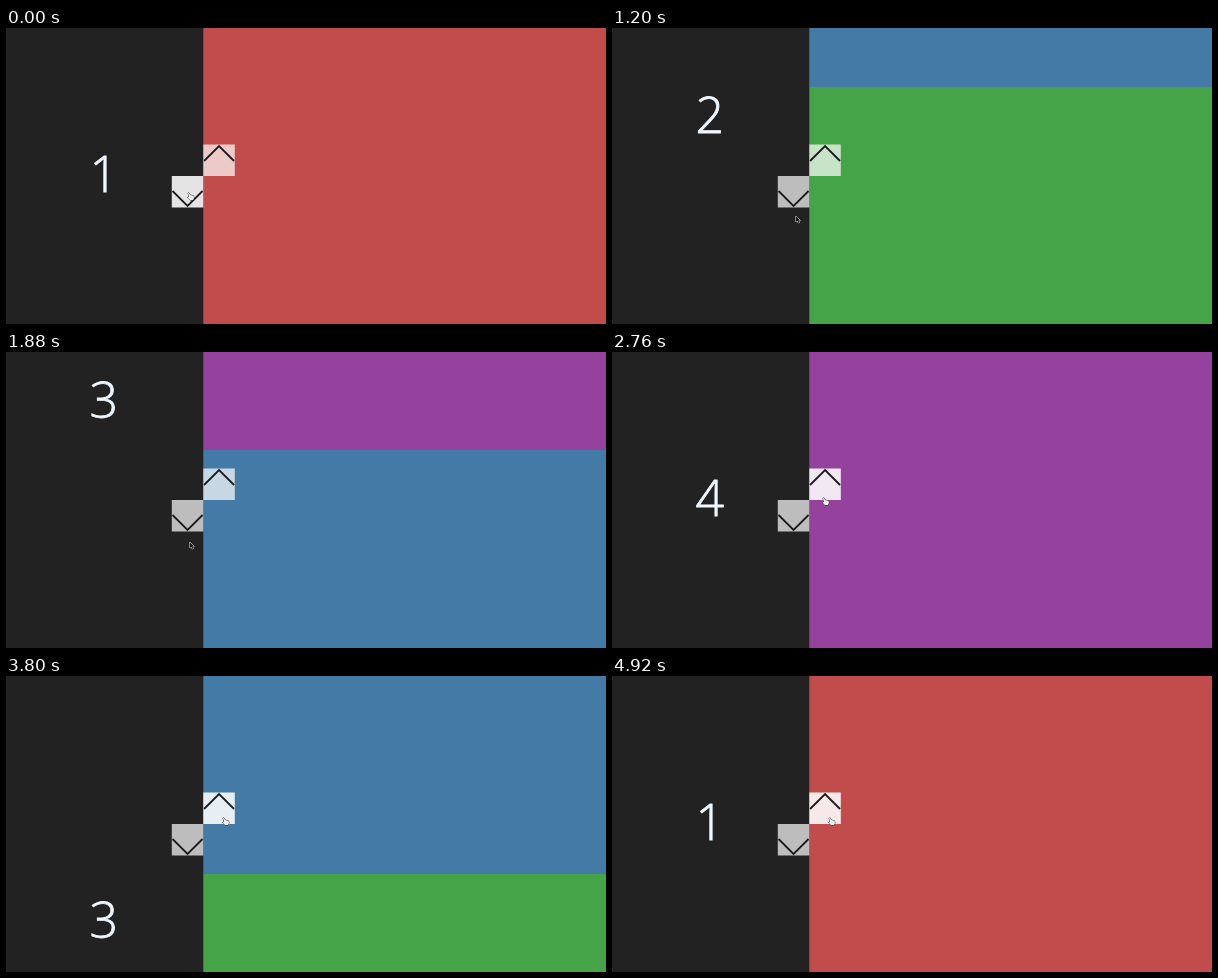
Write an HTML page with a canvas that moves like this. It is 600 by 296 pixels and loops after 4.96 s.

```html
<!DOCTYPE html>
<html lang="en">
<head>
<meta charset="utf-8">
<title>Double vertical slider</title>
<style>
  html, body { margin: 0; height: 100%; overflow: hidden; background: #232223; }
  canvas { display: block; }
</style>
</head>
<body>
<canvas id="stage" width="600" height="296"></canvas>
<script>
const ctx = document.getElementById('stage').getContext('2d');
const LOOP = 4960, W = 600, H = 296, MIDDLE = H / 2, SPLIT = 197.3;
const SLIDE_MS = 450, BUTTON = 31.5;
const COLORS = ['#c14c4b', '#45a447', '#437ba6', '#95429f'];

// step: slide direction; dip: how far the pointer drops away after the click
const CLICKS = [
  { time: 610, step: 1, dip: 0 },
  { time: 1062, step: 1, dip: 23 },
  { time: 1701, step: 1, dip: 25 },
  { time: 2862, step: -1, dip: 0 },
  { time: 3621, step: -1, dip: 0 },
  { time: 4155, step: -1, dip: 14 }
];
const ON_DOWN = { x: 184, y: 165 }, ON_UP = { x: 219, y: 142 };

const ARROW = new Path2D('M0 0V6L1.4 4.8L2.4 7L3.4 6.5L2.5 4.4H4.2Z');
const HAND = new Path2D('M-2 0H-.8L0 2L3.5 2.8L4 5L3 7H0L-2.5 4.5L-1 4Z');

// cubic-bezier(.42, 0, .58, 1), solved by bisection
function easeInOut(p) {
  if (p <= 0) return 0;
  if (p >= 1) return 1;
  let low = 0, high = 1;
  for (let i = 0; i < 24; i++) {
    const s = (low + high) / 2, r = 1 - s;
    const x = 1.26 * s * r * r + 1.74 * s * s * r + s * s * s;
    if (x < p) low = s; else high = s;
  }
  return low * low * (3 - 2 * low);
}

const ramp = (t, start, duration) => easeInOut((t - start) / duration);
const mix = (a, b, p) => a + (b - a) * p;
const sumClicks = term => CLICKS.reduce((sum, click) => sum + term(click), 0);

function slidePosition(t) {
  return sumClicks(({ time, step }) => step * ramp(t, time, SLIDE_MS));
}

function pointerAt(t) {
  const crossing = ramp(t, 2320, 620);
  const drop = sumClicks(({ time, dip }) =>
    dip * (ramp(t, time, 140) - ramp(t, time + 520, 160)));
  return {
    x: mix(ON_DOWN.x, ON_UP.x, crossing),
    y: mix(ON_DOWN.y, ON_UP.y, crossing) + drop
  };
}

function drawSlides(position) {
  ctx.fillStyle = '#232223';
  ctx.fillRect(0, 0, W, H);
  ctx.font = '300 50px "Open Sans", "Noto Sans", sans-serif';
  ctx.textAlign = 'center';
  ctx.strokeStyle = '#f0f8ff';
  ctx.lineWidth = 0.8;
  COLORS.forEach((color, i) => {
    const offset = (i - position) * H;
    if (Math.abs(offset) >= H) return;
    ctx.fillStyle = color;
    ctx.fillRect(SPLIT, Math.round(-offset), W - SPLIT, H);
    ctx.fillStyle = '#f0f8ff';
    ctx.fillText(i + 1, SPLIT / 2 - 1, 164 + offset);
    ctx.strokeText(i + 1, SPLIT / 2 - 1, 164 + offset);
  });
}

// direction: -1 points up, right of the split; 1 points down, left of it
function drawButton(direction, pointer) {
  const x = direction < 0 ? SPLIT : SPLIT - BUTTON;
  const y = direction < 0 ? MIDDLE - BUTTON : MIDDLE;
  const hovered = pointer.x >= x && pointer.x < x + BUTTON
    && pointer.y >= y && pointer.y < y + BUTTON;
  ctx.fillStyle = `rgba(255, 255, 255, ${hovered ? 0.88 : 0.7})`;
  ctx.fillRect(x, y, BUTTON, BUTTON);

  const centerX = x + BUTTON / 2, tipY = MIDDLE + direction * 30;
  ctx.beginPath();
  ctx.moveTo(centerX - 15, tipY - direction * 15);
  ctx.lineTo(centerX, tipY);
  ctx.lineTo(centerX + 15, tipY - direction * 15);
  ctx.strokeStyle = '#1c1b1c';
  ctx.lineWidth = 1.8;
  ctx.stroke();
  return hovered;
}

function drawPointer({ x, y }, isHand) {
  const shape = isHand ? HAND : ARROW;
  ctx.save();
  ctx.translate(x, y);
  ctx.fillStyle = isHand ? '#eee' : '#1b1b1b';
  ctx.strokeStyle = isHand ? '#333' : '#e4e4e4';
  ctx.lineWidth = 1;
  ctx.stroke(shape);
  ctx.fill(shape);
  ctx.restore();
}

function render(t) {
  const pointer = pointerAt(t);
  drawSlides(slidePosition(t));
  const onUp = drawButton(-1, pointer), onDown = drawButton(1, pointer);
  drawPointer(pointer, onUp || onDown);
}

const startTime = performance.now();
function tick() {
  render((performance.now() - startTime) % LOOP);
  requestAnimationFrame(tick);
}
tick();
</script>
</body>
</html>
```
